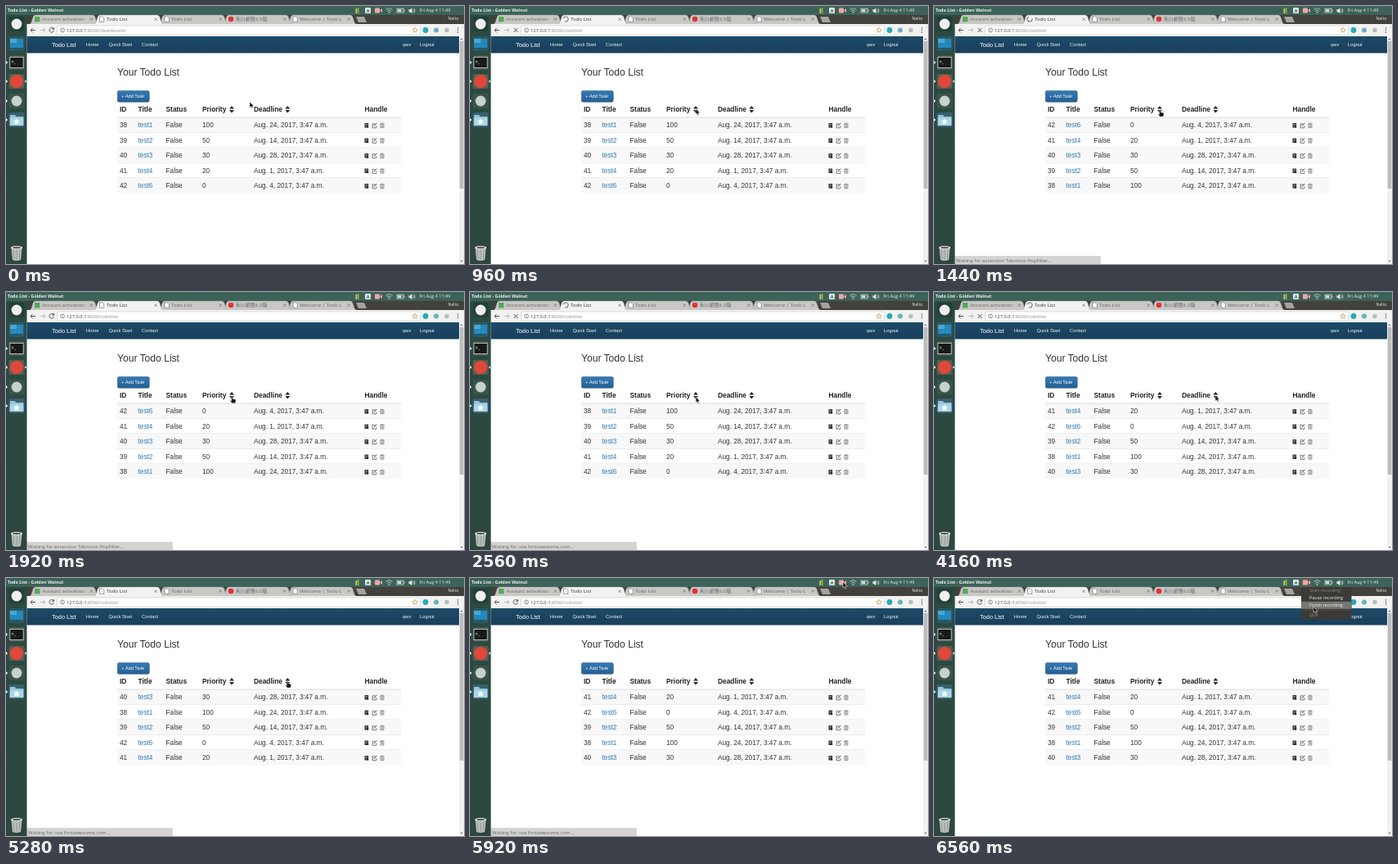
Write an HTML page that moves like this. It is 560 px wide and 315 px high and loops after 6720 ms.

```html
<!DOCTYPE html>
<html lang="en">
<head>
<meta charset="utf-8">
<title>Todo List</title>
<style>
html, body { margin: 0; width: 100%; height: 100%; overflow: hidden; background: #fff; }
svg { display: block; width: 560px; height: 315px; }
text { white-space: pre; }
.page { font-family: "Liberation Sans", Arial, sans-serif; }
.ui { font-family: "Open Sans", "Noto Sans", "Noto Sans CJK SC", sans-serif; }
</style>
</head>
<body>
<svg id="stage" viewBox="0 0 560 315">
  <defs>
    <linearGradient id="dock" x1="0" y1="0" x2="0" y2="1">
      <stop offset="0" stop-color="#2b4a43"/><stop offset="1" stop-color="#2d463f"/>
    </linearGradient>
    <linearGradient id="nav" x1="0" y1="0" x2="0" y2="1">
      <stop offset="0" stop-color="#1d4a69"/><stop offset="1" stop-color="#193f5b"/>
    </linearGradient>
    <linearGradient id="btn" x1="0" y1="0" x2="0" y2="1">
      <stop offset="0" stop-color="#337ab7"/><stop offset="1" stop-color="#285f8f"/>
    </linearGradient>
  </defs>
</svg>
<script>
const LOOP = 6720, STEP = 160;
const stage = document.getElementById('stage');

const rect = (x, y, w, h, fill, more = '') =>
  `<rect x="${x}" y="${y}" width="${w}" height="${h}" fill="${fill}" ${more}/>`;
const dot = (x, y, r, fill, more = '') =>
  `<circle cx="${x}" cy="${y}" r="${r}" fill="${fill}" ${more}/>`;
const shape = (d, fill, more = '') => `<path d="${d}" fill="${fill}" ${more}/>`;
const line = (d, color, w = 1, more = '') =>
  `<path d="${d}" fill="none" stroke="${color}" stroke-width="${w}" ${more}/>`;
const label = (x, y, size, fill, str, cls = 'page', more = '') =>
  `<text x="${x}" y="${y}" font-size="${size}" fill="${fill}" class="${cls}" ${more}>${str}</text>`;
const group = (id, body, more = '') => `<g id="${id}" ${more}>${body}</g>`;
const bold = 'font-weight="700"';

function panel() {
  return rect(0, 0, 560, 11, '#3d625a') +
    label(2, 7.3, 5.4, '#eef0ec', 'Todo List - Golden Walnut', 'ui', bold) +
    rect(427.5, 3, 1.6, 6, '#e3c95a') + rect(429.8, 2, 1.6, 7, '#8cc152') +
    rect(439, 2, 7, 7, '#e4e4df', 'rx=".8"') +
    label(440.8, 7.6, 5.4, '#3d625a', 'A', 'ui', bold) +
    rect(451, 2.5, 6, 6, '#f0a9a4', 'rx="1"') + shape('M457 5.5l3-2.4v4.8z', '#f0a9a4') +
    line('M464.5 4.5q4-3.4 8 0M466 6.2q2.5-2 5 0', '#b9cbc4', 1) + dot(468.5, 8, .9, '#b9cbc4') +
    rect(478, 3.2, 8, 4.8, 'none', 'stroke="#d9dfda" stroke-width=".8"') +
    rect(479, 4.2, 4.5, 2.8, '#d9dfda') + rect(486.4, 4.5, 1, 2.2, '#d9dfda') +
    shape('M492.5 4.3h1.7l2.2-2v7l-2.2-2h-1.7z', '#e8ebe6') +
    line('M497.7 4q1.4 1.7 0 3.4M499 3q2.4 2.7 0 5.4', '#e8ebe6', .7) +
    label(505.5, 7.4, 5.5, '#f0f2ee', 'Fri Aug 4 11:49', 'ui');
}

function dock() {
  const tile = (y, fill) => rect(3.5, y - 9, 19, 18, fill, 'rx="2"');
  return rect(0, 11, 25.5, 304, 'url(#dock)') +
    tile(22, '#24403a') + dot(13, 22, 6.4, '#f1efec') +
    tile(46, '#2c5a63') + rect(5, 40, 16, 11, '#2589bd') + rect(5, 40, 8, 5, '#4ba7d4') +
    rect(11, 51, 4, 2, '#1c5575') +
    tile(69, '#48564f') + rect(4.8, 62.5, 16.4, 13, '#171a19', 'stroke="#c9cdc9" stroke-width=".9"') +
    label(6.8, 69.5, 5, '#f1f1f1', '&gt;_', 'ui', bold) +
    tile(92, '#56604d') + dot(13, 92, 8, '#e0473a') +
    tile(116, '#3a544c') + dot(13, 116, 6.4, '#c6d3cc') +
    tile(139, '#3b6069') + shape('M4.8 133h6l1.5 2h9v11H4.8z', '#8fc4de') +
    rect(4.8, 136.5, 16.5, 9.5, '#a9d6ea') + shape('M13 138l3.6 3h-1v3h-5.2v-3h-1z', '#fff') +
    [69, 92, 116, 139].map(y => shape(`M0 ${y - 2}l2.4 2-2.4 2z`, '#e6ebe8')).join('') +
    shape('M24.8 90.2l-2.2 1.8 2.2 1.8z', '#e6ebe8') +
    shape('M6.5 295h13l-1.4 15q-5.1 1.8-10.2 0z', '#b9bfbb') +
    line('M9 297l.8 12M13 297v13M17 297l-.8 12', '#858e89', .7) +
    `<ellipse cx="13" cy="295" rx="7.2" ry="2.2" fill="#e4e7e4"/>` +
    `<ellipse cx="13" cy="295" rx="5" ry="1.2" fill="#5b6661"/>`;
}

const pageIcon = x => shape(`M${x} 12.8h3.4l1.8 1.8v4.8h-5.2z`, '#fff', 'stroke="#777" stroke-width=".7"');

function tab(x, icon, str, live) {
  const fill = live ? '#f2f2f1' : '#c9c8c5', ink = live ? '#333' : '#666';
  return shape(`M${x - 2} 22.5q2.5-.5 3.5-4l1.5-5q.8-2.5 3-2.5h70q2.2 0 3 2.5l1.5 5q1 3.5 3.5 4z`,
      fill, 'stroke="#92918d" stroke-width=".4"') + icon +
    label(x + 14, 18.2, 6.1, ink, str, 'ui') +
    rect(x + 66, 12.5, 6, 8, fill) +
    line(`M${x + 72.5} 14.4l3.4 3.4m0-3.4l-3.4 3.4`, '#777', .8);
}

function browser() {
  const faded = '#8b8b8b';
  return rect(25, 11, 535, 12, '#42413c') +
    label(540.5, 16.6, 5.2, '#e6e6e2', 'Nelia', 'ui') +
    tab(345, pageIcon(351), 'Welcome | Todo Li', false) +
    tab(266.5, dot(275, 16, 3.3, '#df3434'), '禾川邮匣6.0版', false) +
    tab(188, pageIcon(194), 'Todo List', false) +
    tab(30, rect(35, 13, 6.4, 6.4, '#59a65b'), 'Account activation', false) +
    tab(109, group('tabPage', pageIcon(114.5)) +
      group('spinner', line('M0 -3A3 3 0 1 1 -3 0', '#666', 1)), 'Todo List', true) +
    shape('M428 13h10l3 7h-10z', '#a5a39e') +
    rect(25, 22, 535, 15, '#f2f2f1') +
    line('M36 29.5h-6m2.6-2.6l-2.6 2.6 2.6 2.6', '#555', 1) +
    line('M42 29.5h6m-2.6-2.6l2.6 2.6-2.6 2.6', '#b5b5b5', 1) +
    group('reload', line('M58 27.6a2.8 2.8 0 1 0 .5 2.6', '#555', 1) + shape('M59 25.8v3h-3z', '#555')) +
    group('stop', line('M53.5 27l5 5m0-5l-5 5', '#555', 1)) +
    rect(62.5, 24, 444, 11, '#fff', 'rx="1.2" stroke="#c8c8c6" stroke-width=".6"') +
    dot(69, 29.5, 2.6, 'none', 'stroke="#666" stroke-width=".7"') + rect(68.6, 28.9, .8, 2, '#666') +
    rect(68.6, 27.7, .8, .7, '#666') +
    `<text x="74" y="31.6" font-size="5.8" class="ui" fill="#333">127.0.0.1` +
    `<tspan fill="${faded}">:8000/<tspan id="path"></tspan></tspan></text>` +
    shape('M500 26.2l.9 2.2 2.3.1-1.8 1.5.6 2.3-2-1.3-2 1.3.6-2.3-1.8-1.5 2.3-.1z', '#fff',
      'stroke="#b69838" stroke-width=".7"') +
    dot(513, 29.5, 3.4, '#25aab8') + dot(526, 29.5, 3, '#64b5b9') + dot(539, 29.5, 2.7, '#b6bcc0') +
    [27, 29.5, 32].map(y => dot(552.5, y, .8, '#555')).join('');
}

const sorter = x => shape(`M${x - 3} 125.4l3-3.4 3 3.4zM${x - 3} 127l3 3.4 3-3.4z`, '#222');

const tasks = {
  38: ['test1', 100, 24], 39: ['test2', 50, 14], 40: ['test3', 30, 28],
  41: ['test4', 20, 1], 42: ['test6', 0, 4]
};
const ROW = 18.5, TOP = 136;

function taskRow(id) {
  const [name, priority, day] = tasks[id], ink = '#333', cell = (x, s, c = ink) => label(x, 12.2, 8.25, c, s);
  return group('task' + id, cell(139, id) + cell(161.5, name, '#337ab7') + cell(195.5, 'False') +
    cell(240, priority) + cell(303, `Aug. ${day}, 2017, 3:47 a.m.`));
}

function handles(y) {
  return rect(438.5, y - 2.8, 4.6, 5.6, '#333', 'rx=".5"') +
    line(`M439.6 ${y - 1.2}h2.4m-2.4 1.5h1.6`, '#ddd', .6) + dot(442.3, y + 1.8, 1.1, '#333') +
    line(`M451 ${y - 2}h-3v5h4.8v-2.6`, '#444', .7) + line(`M449.8 ${y + 1}l3.2-3.8`, '#333', 1) +
    line(`M457.3 ${y - 1.7}h5.2m-3.5 0v-1h1.8v1m-2.9 0v4.5h4v-4.5M459.3 ${y - .4}v2.2m1.2-2.2v2.2`, '#555', .6);
}

function page() {
  const head = (x, s) => label(x, 129.2, 8.4, '#222', s, 'page', bold);
  const link = (x, s) => label(x, 49.3, 5.8, '#f4f7f9', s);
  let out = rect(25.5, 37, 534.5, 278, '#fff') + rect(25.5, 37, 528.5, 20.5, 'url(#nav)') +
    label(56, 49.8, 7.4, '#fff', 'Todo List') +
    link(98, 'Home') + link(125.5, 'Quick Start') + link(166, 'Contact') +
    link(485, 'qwv') + link(506, 'Logout') +
    rect(554, 37, 6, 278, '#f1f1f1') + rect(554.8, 43, 4.6, 180, '#bcbcbc') +
    shape('M555.3 41.2l1.7-2 1.7 2z', '#777') + shape('M555.3 310.8l1.7 2 1.7-2z', '#777') +
    label(136, 85.3, 12.1, '#333', 'Your Todo List') +
    rect(136.3, 103.5, 39, 13.8, 'url(#btn)', 'rx="2" stroke="#245580" stroke-width=".5"') +
    label(141, 112.4, 5.75, '#fff', '+ Add Task') +
    head(139, 'ID') + head(161.5, 'Title') + head(195.5, 'Status') + head(240, 'Priority') +
    head(303, 'Deadline') + head(438.5, 'Handle') + sorter(276) + sorter(344.3);
  for (let i = 0; i < 5; i++) {
    const y = TOP + i * ROW;
    if (i % 2 === 0) out += rect(136, y, 347, ROW, '#f8f8f8');
    out += rect(136, y - .4, 347, i ? .5 : 1, '#ddd') + handles(y + 9.8);
  }
  return out + Object.keys(tasks).map(taskRow).join('') +
    group('status', rect(25, 305.5, 178.5, 10, '#d3d3d1', 'rx="1" stroke="#bbb" stroke-width=".4"') +
      '<text id="note" x="27" y="312.8" font-size="6" fill="#666" class="ui"></text>');
}

function menu() {
  const item = (y, s, c) => label(459, y, 5.5, c, s, 'ui');
  return group('menu', rect(449, 0, 13, 11, '#55605a') + rect(451, 2.5, 6, 6, '#f0a9a4', 'rx="1"') +
    shape('M457 5.5l3-2.4v4.8z', '#f0a9a4') +
    rect(449, 11, 61.5, 39.5, '#3b3a36') + rect(449, 28.8, 61.5, 9, '#777672', 'id="hover"') +
    item(17.2, 'Start recording', '#8b8a85') + item(26.3, 'Pause recording', '#f2f1ec') +
    item(35.4, 'Finish recording', '#f2f1ec') + rect(450, 39.4, 59.5, .5, '#55544f') +
    item(47, 'Quit', '#8b8a85'));
}

const pointer = group('arrow', shape('M0 0v7.2l1.7-1.5 1.1 2.6 1.2-.5-1.1-2.6h2.3z', '#111',
    'stroke="#fff" stroke-width=".5"')) +
  group('hand', shape('M-.7 0q.7-.8 1.4 0v2.6l3.3.8q.8.3.6 1.2l-.7 3.4h-4.2l-2.2-3q.2-1 1.8.2z', '#111',
    'stroke="#fff" stroke-width=".4"'));

stage.insertAdjacentHTML('beforeend',
  panel() + browser() + page() + dock() + menu() + group('cursor', pointer));

const $ = id => document.getElementById(id);
const show = (id, on) => $(id).setAttribute('visibility', on ? 'inherit' : 'hidden');
const move = (id, x, y, turn = 0) =>
  $(id).setAttribute('transform', `translate(${x} ${y}) rotate(${turn})`);

// Each track: [start ms, value]
const byPriorityDown = [38, 39, 40, 41, 42], byPriorityUp = [42, 41, 40, 39, 38];
const byDateUp = [41, 42, 39, 38, 40], byDateDown = [40, 38, 39, 42, 41];
const orders = [[0, byPriorityDown], [1280, byPriorityUp], [2400, byPriorityDown],
  [3200, byDateUp], [4640, byDateDown], [5600, byDateUp]];
const loading = [[0, 0], [800, 1], [1600, 0], [2240, 1], [2720, 0], [3040, 1], [3520, 0],
  [4000, 1], [4960, 0], [5440, 1], [5920, 0]];
const fontNote = 'Waiting for use.fontawesome.com...', blockNote = 'Waiting for extension Tabmoss PopFilter...';
const notes = [[0, ''], [1120, fontNote], [1440, blockNote], [2240, ''], [2400, fontNote], [2880, ''],
  [4640, fontNote], [5440, ''], [5600, fontNote], [6080, '']];
const hands = [[0, 0], [1280, 1], [2240, 0], [2400, 0], [4640, 1], [5440, 0]];
const route = [[0, 298, 117], [320, 298, 117], [800, 276, 125], [1280, 276.5, 127], [2240, 276.5, 128],
  [2720, 276, 128], [2960, 344, 126], [3360, 344, 126], [3680, 338, 214], [3920, 344, 126],
  [5440, 344, 126], [5600, 517, 72], [5920, 456, 5], [6240, 456, 6], [6560, 464, 35]];

const at = (track, t) => track.reduce((v, [start, next]) => t >= start ? next : v, track[0][1]);

function along(t) {
  const i = route.findIndex(p => p[0] > t);
  if (i < 0) return route[route.length - 1].slice(1);
  const [t0, x0, y0] = route[i - 1], [t1, x1, y1] = route[i];
  const k = (t - t0) / (t1 - t0), e = k * k * (3 - 2 * k);
  return [x0 + (x1 - x0) * e, y0 + (y1 - y0) * e];
}

function draw(now) {
  const t = Math.floor(now % LOOP / STEP) * STEP;
  const busy = at(loading, t), note = at(notes, t), hand = at(hands, t);
  at(orders, t).forEach((id, i) => move('task' + id, 0, TOP + i * ROW));
  show('tabPage', !busy); show('spinner', busy);
  show('reload', !busy); show('stop', busy);
  move('spinner', 117, 16, -t * .45);
  $('path').textContent = t < 800 ? 'dashboard/' : 'todolist/';
  show('status', note);
  $('note').textContent = note;
  show('menu', t >= 6080);
  show('hover', t >= 6400);
  move('cursor', ...along(t));
  show('arrow', !hand); show('hand', hand);
}

const began = performance.now();
function tick() {
  draw(performance.now() - began);
  requestAnimationFrame(tick);
}
tick();
</script>
</body>
</html>
```
